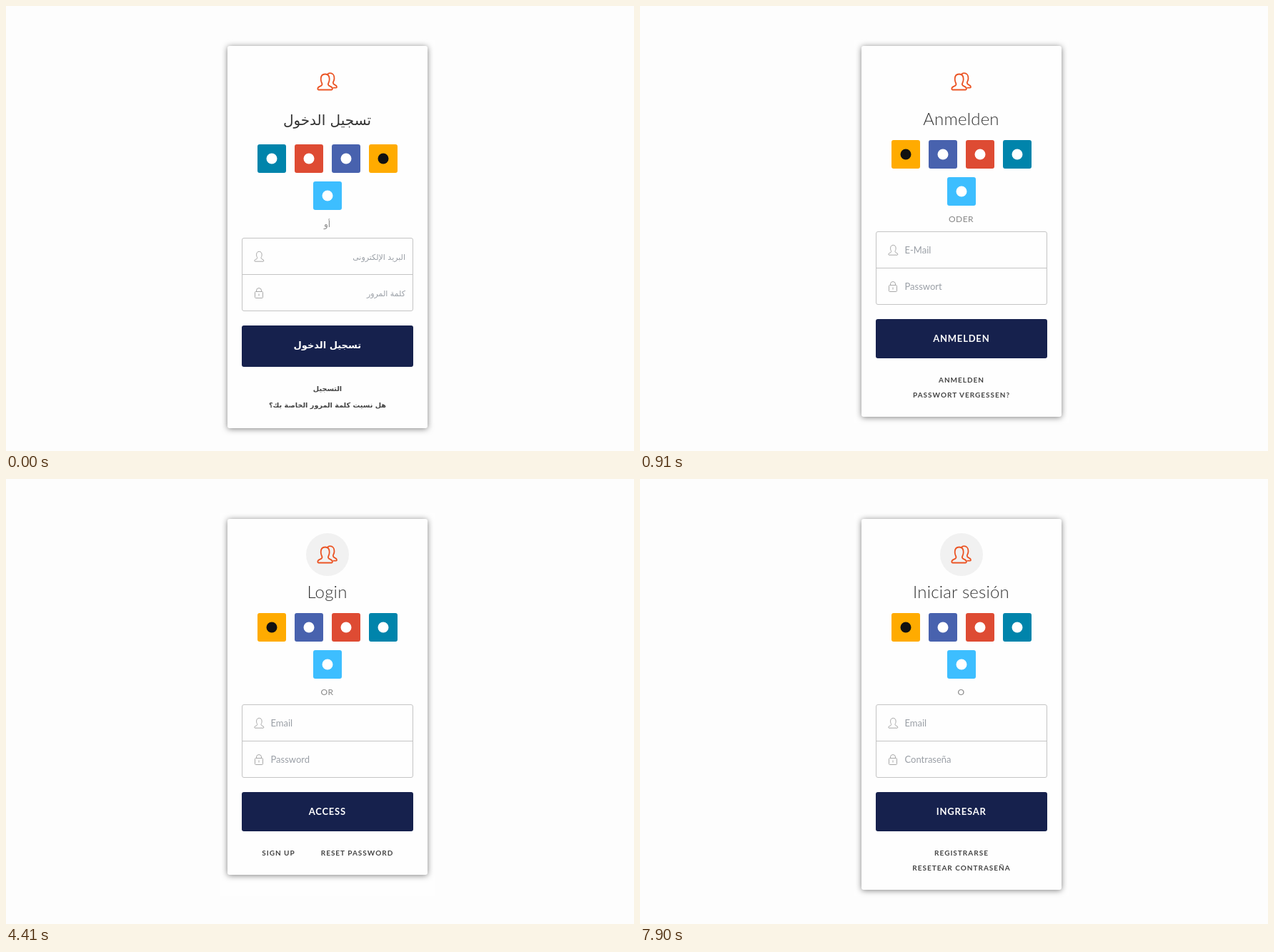
An HTML page for the animation above (8 s loop, 879 by 624 pixels).

```html
<!DOCTYPE html>
<html lang="en">
<head>
<meta charset="utf-8">
<title>Login panel in four languages</title>
<style>
  html, body { margin: 0; width: 100%; height: 100%; overflow: hidden; background: #fdfdfd; }
  svg { display: block; }
  text { font-family: Lato, "Open Sans", sans-serif; text-anchor: middle; }
  .rtl text { font-family: "DejaVu Sans", sans-serif; letter-spacing: 0 !important; direction: rtl; }
  .card { fill: #fefefe; filter: drop-shadow(0 1px 4px rgba(0, 0, 0, .5)); }
  .title { font-size: 24px; font-weight: 300; letter-spacing: .2px; fill: #333; }
  .or { font-size: 12px; letter-spacing: .5px; fill: #888; }
  .hint { font-size: 13px; text-anchor: start; fill: #9a9fa6; }
  .action { font-size: 13px; font-weight: 700; letter-spacing: .8px; fill: #fff; }
  .link { font-size: 10px; font-weight: 700; letter-spacing: 1px; fill: #444; }
  .rtl .title { font-size: 20px; font-weight: 400; }
  .rtl .hint { font-size: 11px; }
  .rtl .link { font-size: 9.7px; }
  .badge { fill: none; stroke: #eb5424; stroke-width: 1.8; stroke-linecap: round; stroke-linejoin: round; }
  .line { fill: none; stroke: #c4c4c4; }
  .icon { fill: none; stroke: #a8a8a8; }
  .icon path, .icon rect { vector-effect: non-scaling-stroke; }
</style>
</head>
<body>
<svg id="stage" width="879" height="624" viewBox="0 0 879 624"></svg>
<script>
const PERSON = 'M437.5 117.5h18.2q1.2 0 1.2-1.5c0-4-6-2.6-6-6.2c0-2 1.8-2.6 1.8-7.3' +
  'c0-4.4-2.4-7-6-7s-6 2.6-6 7c0 4.7 1.8 5.3 1.8 7.3c0 3.6-6.2 2.2-6.2 6.2q0 1.5 1.2 1.5z';
const PERSON_BEHIND = 'M450.5 95.2c1-.7 2-1 3.2-1c3.4 0 5.8 2.6 5.8 7c0 4-1.7 4.6-1.7 6.6' +
  'c0 3.4 5.2 2.2 5.2 5.7q0 1.2-1 1.2h-3.5';
const TILES = ['#ffab00', '#4862ae', '#de4b33', '#0084ab'];

// steps: [start time, opacity of the form]
const panels = [
  { rtl: true, bottom: 592, title: 'تسجيل الدخول', or: 'أو',
    hints: ['البريد الإلكترونى', 'كلمة المرور'], action: 'تسجيل الدخول',
    links: [['التسجيل', 450, 540], ['هل نسيت كلمة المرور الخاصة بك؟', 450, 563]],
    steps: [[0, 1]], end: 500 },
  { bottom: 576, title: 'Anmelden', or: 'ODER',
    hints: ['E-Mail', 'Passwort'], action: 'ANMELDEN',
    links: [['ANMELDEN', 450, 528], ['PASSWORT VERGESSEN?', 450, 549]],
    steps: [[500, .3], [740, .65], [910, 1]], end: 3910 },
  { bottom: 555, disc: true, title: 'Login', or: 'OR',
    hints: ['Email', 'Password'], action: 'ACCESS',
    links: [['SIGN UP', 381.5, 528], ['RESET PASSWORD', 491.5, 528]],
    steps: [[4060, .3], [4200, .65], [4410, 1]], end: 7400 },
  { bottom: 576, disc: true, title: 'Iniciar sesión', or: 'O',
    hints: ['Email', 'Contraseña'], action: 'INGRESAR',
    links: [['REGISTRARSE', 450, 528], ['RESETEAR CONTRASEÑA', 450, 549]],
    steps: [[7550, .3], [7730, .65], [7900, 1]], end: 8000 }
];

const label = (cls, x, y, s) => `<text class="${cls}" x="${x}" y="${y}">${s}</text>`;

const tile = (x, y, color, dot = '#fff') =>
  `<rect x="${x}" y="${y}" width="40" height="40" rx="3" fill="${color}"/>
   <circle cx="${x + 20}" cy="${y + 20}" r="7.5" fill="${dot}"/>`;

function panelMarkup(p) {
  const top = p.rtl ? 194 : 188;
  const drop = p.rtl ? 9 : 0;
  const hintX = p.rtl ? 559 : 370.5;
  const tiles = TILES.map((color, i) =>
    tile(352 + 52 * (p.rtl ? 3 - i : i), top, color, i ? '#fff' : '#111')).join('');
  return `<g class="${p.rtl ? 'rtl' : ''}">
    <rect class="card" x="310" y="56" width="280" height="${p.bottom - 56}" rx="3"/>
    ${p.disc ? '<circle cx="450" cy="106" r="30" fill="#f1f1f1"/>' : ''}
    <path class="badge" d="${PERSON}${PERSON_BEHIND}"/>
    ${label('title', 449.5, 167, p.title)}
    <g class="form">
      ${tiles}${tile(430, top + 52, '#3dbeff')}
      ${label('or', 449.5, p.rtl ? 310 : 303, p.or)}
      <g transform="translate(0 ${drop})">
        <rect class="line" x="330.5" y="316.5" width="239" height="102" rx="2.5"/>
        <path class="line" d="M330 367.5h240"/>
        <g class="icon">
          <path d="${PERSON}" transform="translate(347.8 335.3) scale(.63) translate(-436.3 -95.5)"/>
          <rect x="348.5" y="391.5" width="11" height="9" rx="1"/>
          <path d="M350.5 391.5v-1.5a3.5 3.5 0 0 1 7 0v1.5M354 394.5v3"/>
        </g>
        ${p.hints.map((s, i) => label('hint', hintX, 347 + 51 * i, s)).join('')}
        <rect x="330" y="439" width="240" height="${p.rtl ? 58 : 55}" rx="3" fill="#16214d"/>
        ${label('action', 449.8, 471, p.action)}
      </g>
      ${p.links.map(([s, x, y]) => label('link', x, y, s)).join('')}
    </g>
  </g>`;
}

const stage = document.getElementById('stage');
stage.innerHTML = '<rect x="300" y="48" width="300" height="537" fill="#fefefe"/>' +
  panels.map(panelMarkup).join('');
const forms = [...stage.querySelectorAll('.form')];

function draw(now) {
  const t = now % 8000;
  panels.forEach((p, i) => {
    const step = p.steps.filter(([start]) => t >= start).pop();
    forms[i].parentNode.style.display = step && t < p.end ? '' : 'none';
    if (step) forms[i].style.opacity = step[1];
  });
}

let origin;
function tick(now) {
  origin ??= now;
  draw(now - origin);
  requestAnimationFrame(tick);
}
draw(0);
requestAnimationFrame(tick);
</script>
</body>
</html>
```
